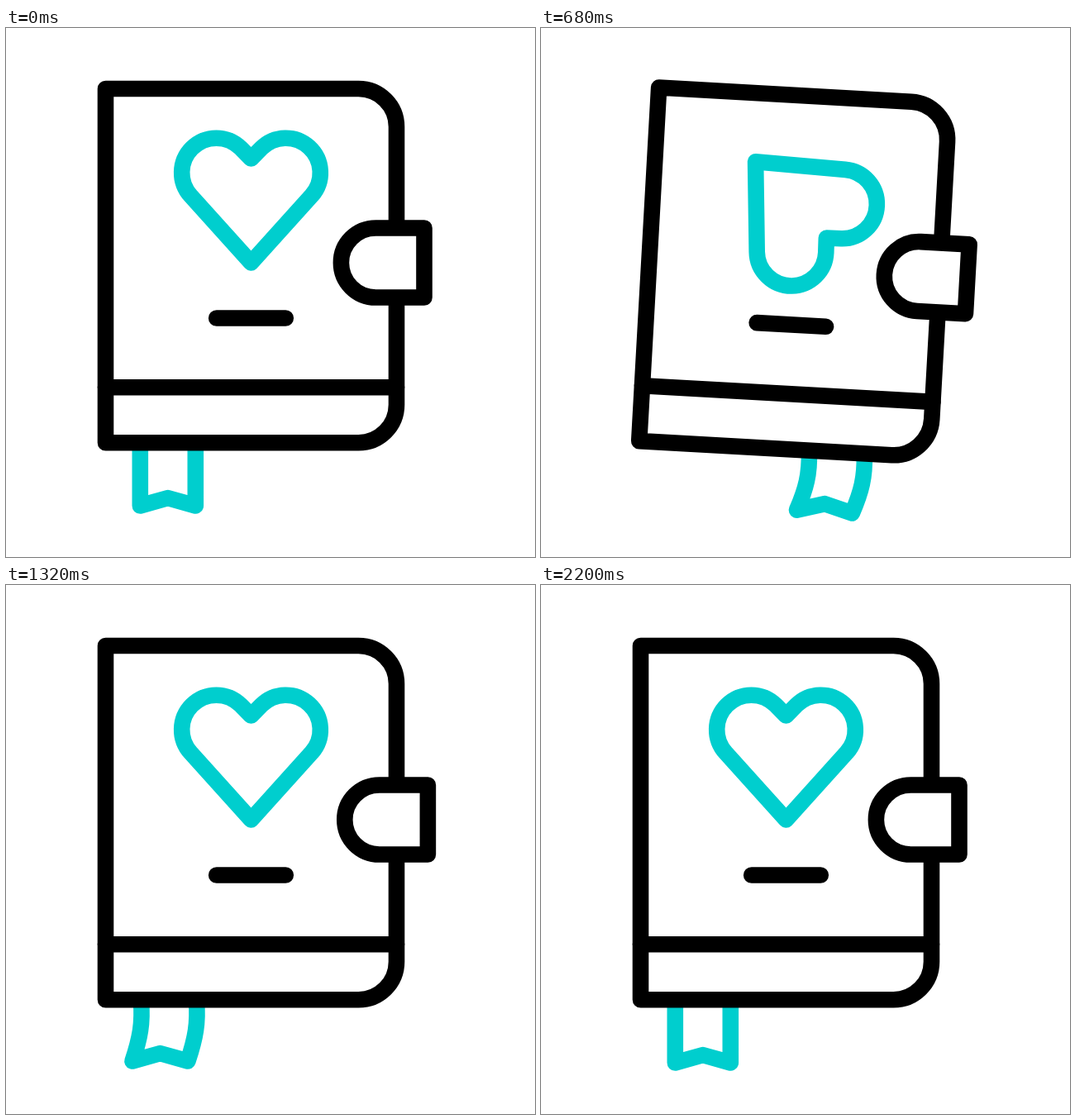
An HTML page with a canvas for the animation above (2760 ms loop, 640 by 640 pixels).

```html
<!DOCTYPE html>
<html lang="en">
<head>
<meta charset="utf-8">
<title>Diary</title>
<style>
html, body { margin: 0; width: 100%; height: 100%; overflow: hidden; background: #fff; }
canvas { display: block; width: 640px; height: 640px; }
</style>
</head>
<body>
<canvas id="stage" width="640" height="640"></canvas>
<script>
const ctx = document.getElementById('stage').getContext('2d');
const LOOP = 2760, STEP = 40, LAST = 2200;
const BLACK = '#000', TEAL = '#00cece';
const PIVOT = [157, 469], HEART = [296.5, 208.7];

// Tracks of [ms, value], joined by straight lines
const tilt = [[0, 0], [267, -7.4], [600, 4.93], [933, -2.25], [1200, 0]];
const spin = [[0, 0], [267, -21.3], [680, 133.9], [1000, 282.6], [1200, 360]];
const slide = [[0, 0], [267, -20.8], [700, 172], [1200, 0]];
const bend = [[0, 0], [133, 6], [267, 3.8], [467, -14], [680, -11.5], [867, 7],
  [1000, 0.5], [1320, -11], [1467, 7], [1600, -4], [1733, 0]];
const lift = [[0, 0], [240, 3.4], [1000, 3.6], [1320, 2], [1720, 0]];
const pull = [[1267, 0], [1533, 22], [1800, 1.1], [2000, 19.3], [2200, 0]];

function at(track, t) {
  if (t <= track[0][0]) return track[0][1];
  for (let i = 1; i < track.length; i++) {
    const [t0, a] = track[i - 1], [t1, b] = track[i];
    if (t < t1) return a + (b - a) * (t - t0) / (t1 - t0);
  }
  return track[track.length - 1][1];
}

function rotate([x, y], deg) {
  ctx.translate(x, y);
  ctx.rotate(deg * Math.PI / 180);
  ctx.translate(-x, -y);
}

function stroke(color, build, fill) {
  ctx.beginPath();
  build();
  if (fill) {
    ctx.fillStyle = fill;
    ctx.fill();
  }
  ctx.strokeStyle = color;
  ctx.stroke();
}

function line(x0, y0, x1, y1) {
  ctx.moveTo(x0, y0);
  ctx.lineTo(x1, y1);
}

function ribbon(dx, b, up) {
  const left = 162.3 + dx, right = left + 67, low = 578 - up, end = 0.85 * b;
  stroke(TEAL, () => {
    ctx.moveTo(left - 0.1 * b, 503);
    ctx.bezierCurveTo(left - 0.3 * b, 530, left, 548, left + end, low);
    ctx.lineTo(left + 33.5 + end, low - 9.4);
    ctx.lineTo(right + end, low);
    ctx.bezierCurveTo(right, 548, right - 0.3 * b, 530, right - 0.1 * b, 503);
  });
}

function cover() {
  stroke(BLACK, () => {
    ctx.moveTo(120.5, 73.5);
    ctx.arcTo(472.5, 73.5, 472.5, 200, 46);
    ctx.arcTo(472.5, 501.7, 300, 501.7, 46);
    ctx.lineTo(120.5, 501.7);
    ctx.closePath();
  }, '#fff');
  stroke(BLACK, () => line(120.5, 434.7, 472.5, 434.7));
  stroke(BLACK, () => line(254.7, 351, 338.3, 351));
}

function heart(deg) {
  ctx.save();
  rotate(HEART, deg);
  const q = Math.PI / 4, side = 0.766 * Math.PI;
  stroke(TEAL, () => {
    ctx.moveTo(296.5, 158);
    ctx.arc(254.5, 175, 41.8, -q, -2 * Math.PI + side, true);
    ctx.lineTo(296.5, 284);
    ctx.arc(338.5, 175, 41.8, Math.PI - side, -3 * q, true);
    ctx.closePath();
  });
  ctx.restore();
}

function clasp(dx) {
  stroke(BLACK, () => {
    ctx.moveTo(506 + dx, 242);
    ctx.lineTo(447.4 + dx, 242);
    ctx.arc(447.4 + dx, 284, 42, -Math.PI / 2, Math.PI / 2, true);
    ctx.lineTo(506 + dx, 326);
    ctx.closePath();
  }, '#fff');
}

function draw(t) {
  ctx.fillStyle = '#fff';
  ctx.fillRect(0, 0, 640, 640);
  ctx.lineWidth = 19.6;
  ctx.lineCap = ctx.lineJoin = 'round';
  ctx.save();
  rotate(PIVOT, at(tilt, t));
  ribbon(at(slide, t), at(bend, t), at(lift, t));
  cover();
  heart(at(spin, t));
  clasp(at(pull, t));
  ctx.restore();
}

const start = performance.now();
function tick() {
  const t = (performance.now() - start) % LOOP;
  draw(Math.min(LAST, Math.floor(t / STEP) * STEP));
  requestAnimationFrame(tick);
}
tick();
</script>
</body>
</html>
```
